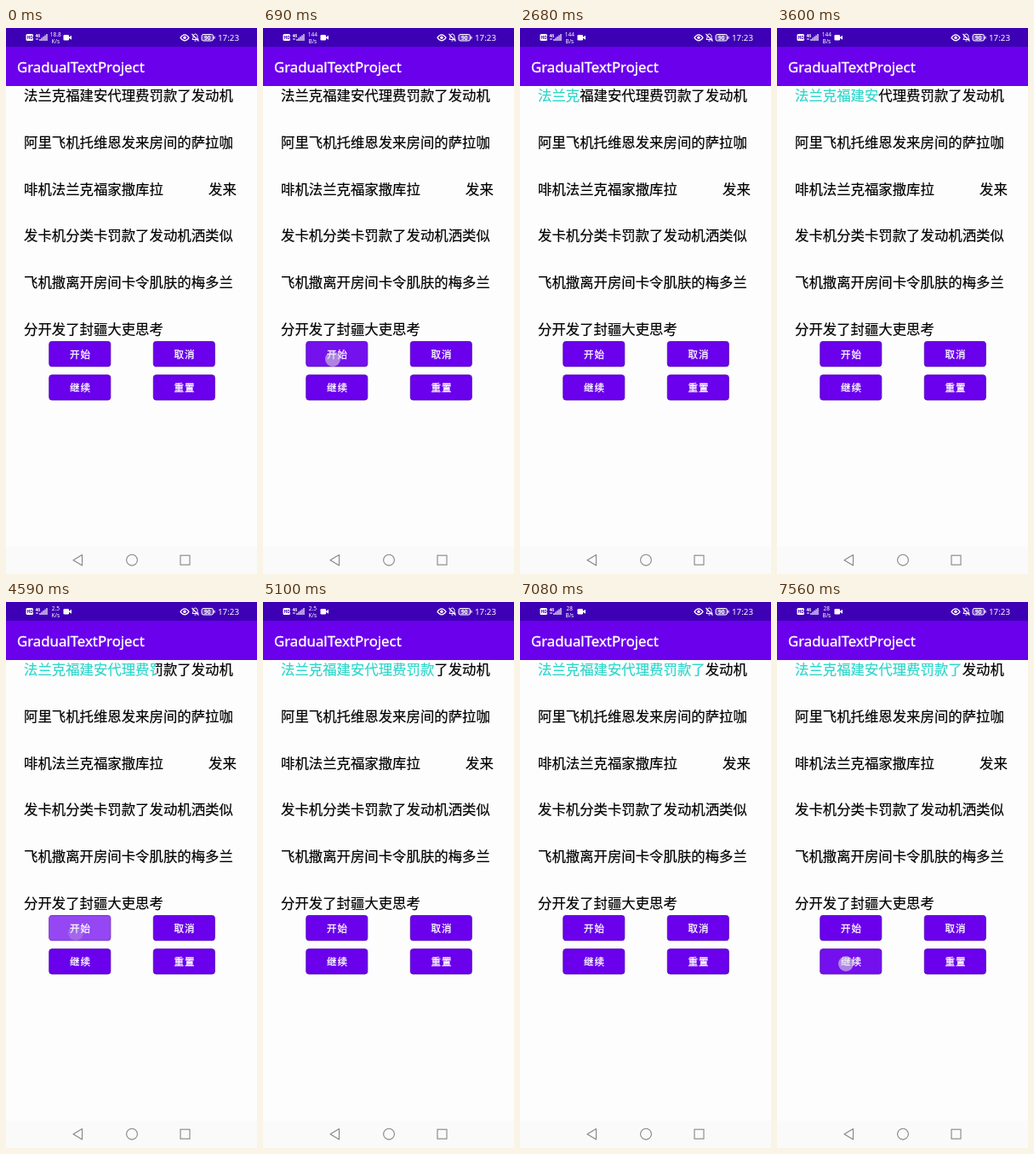
Recreate the animation shown at these times as an HTML page. Size 295x640 px, loop 8 s.

```html
<!DOCTYPE html>
<html lang="zh-CN">
<head>
<meta charset="utf-8">
<title>GradualTextProject</title>
<style>
html, body { margin: 0; height: 100%; overflow: hidden; background: #fdfdfd; }
svg { display: block; width: 295px; height: 640px; }
text { font-family: "Noto Sans CJK SC", "Noto Sans CJK", sans-serif; }
.latin, .latin text { font-family: "Noto Sans", sans-serif; fill: #fff; }
.title { font-size: 16.8px; stroke: #fff; stroke-width: .35px; }
.body { font-size: 16.4px; fill: #000; stroke: #000; stroke-width: .2px; }
.body .lit { fill: #2ed6cb; stroke: #2ed6cb; }
.label { font-size: 11.5px; font-weight: 500; letter-spacing: 1px; fill: #fff; stroke: #fff; stroke-width: .3px; text-anchor: middle; }
.button { fill: #6a00ec; stroke: #5200c0; stroke-width: .8px; filter: drop-shadow(0 .5px .5px #0004); }
</style>
</head>
<body>
<svg viewBox="0 0 295 640">
  <defs>
    <clipPath id="done"><rect id="doneBox" x="21" y="68" width="0" height="24"/></clipPath>
    <clipPath id="rest"><rect id="restBox" x="21" y="68" width="250" height="24"/></clipPath>
  </defs>
  <rect width="295" height="640" fill="#fdfdfd"/>
  <rect y="22" width="295" height="46" fill="#6a00ec"/>
  <rect width="295" height="22" fill="#3e00b4"/>
  <text class="latin title" x="13" y="52">GradualTextProject</text>

  <g class="latin">
    <rect x="23.5" y="7" width="8.5" height="8" rx="1.5" fill="#fff"/>
    <text x="24.5" y="13.2" font-size="5" font-weight="700" style="fill:#3e00b4">HD</text>
    <text x="34.5" y="10.5" font-size="5" font-weight="600">46</text>
    <path d="M35 13h3M40 15v-2M42 15v-3.5M44 15v-5M46 15v-6.5M48 15v-8" stroke="#fff" stroke-width="1.2"/>
    <g font-size="6.5" text-anchor="middle">
      <text id="rate" x="58.3" y="10.2"></text>
      <text id="unit" x="58.3" y="17.7"></text>
    </g>
    <rect x="67.5" y="8" width="6.5" height="6.5" rx="1.3" fill="#fff"/>
    <path d="M74 10.8l3-2v5l-3-2z" fill="#fff"/>
    <path d="M205 11.3q5-7 10 0q-5 7-10 0z" fill="none" stroke="#fff" stroke-width="1.2"/>
    <circle cx="210" cy="11.3" r="1.8" fill="#fff"/>
    <path d="M219 13.5h7l-1-2v-2q-.6-2.5-2.5-2.5t-2.5 2.5v2zM221.5 15h2" fill="none" stroke="#fff"/>
    <path d="M218.5 7l8 8.5" stroke="#fff" stroke-width="1.1"/>
    <rect x="230" y="7.5" width="13.5" height="7.5" rx="2" fill="#fff" fill-opacity=".25" stroke="#fff"/>
    <path d="M245 9.7v3" stroke="#fff" stroke-width="1.2"/>
    <text x="236.8" y="13.6" font-size="6.5" font-weight="600" text-anchor="middle">90</text>
    <text x="249" y="15.2" font-size="9.8">17:23</text>
  </g>

  <g id="lines" class="body"></g>
  <g id="buttons"></g>
  <circle id="finger" r="9" fill="#ddd" opacity="0"/>

  <rect y="608" width="295" height="32" fill="#fafafa"/>
  <g fill="none" stroke="#858585" stroke-width="1.1">
    <path d="M89.5 617.5v12.5L79 623.7z" stroke-linejoin="round"/>
    <circle cx="148" cy="623.7" r="6.4"/>
    <rect x="205" y="618.2" width="11" height="11"/>
  </g>
</svg>
<script>
const $ = id => document.getElementById(id);
const LOOP = 8000, LAST = 7560, WIDTH = 246;

const first = '法兰克福建安代理费罚款了发动机';
const line = (x, row, s, attrs = '') =>
  `<text x="${x}" y="${85 + row * 54.8}" ${attrs}>${s}</text>`;
$('lines').innerHTML =
  line(21, 0, first, 'clip-path="url(#rest)"') +
  line(21, 0, first, 'clip-path="url(#done)" class="lit"') +
  line(21, 1, '阿里飞机托维恩发来房间的萨拉咖') +
  line(21, 2, '啡机法兰克福家撒库拉') + line(238, 2, '发来') +
  line(21, 3, '发卡机分类卡罚款了发动机洒类似') +
  line(21, 4, '飞机撒离开房间卡令肌肤的梅多兰') +
  line(21, 5, '分开发了封疆大吏思考');

$('buttons').innerHTML = ['开始', '取消', '继续', '重置'].map((label, i) => {
  const x = 50.8 + i % 2 * 122.5, y = 367.5 + (i >> 1) * 39.3;
  const box = `x="${x}" y="${y}" width="72" height="29.2" rx="3"`;
  return `<rect class="button" ${box}/><rect id="glow${i}" ${box} fill="#fff" opacity="0"/>
    <text class="label" x="${x + 36.8}" y="${y + 19.1}">${label}</text>`;
}).join('');

const presses = [
  { button: 0, from: 670, to: 930, x: 82, y: 388 },
  { button: 0, from: 4490, to: 5000, x: 82, y: 388 },
  { button: 1, from: 5250, to: 5760, x: 209, y: 386 },
  { button: 2, from: 7540, to: 8050, x: 81, y: 424 }
];
const rates = [[0, '18.8', 'K/s'], [690, '144', 'B/s'], [3690, '2.5', 'K/s'], [6270, '28', 'B/s']];

// Ease-in-out sweep, paused by the cancel button
function sweep(t) {
  const p = Math.max(0, (Math.min(t, 5370) - 710) / 6660);
  return WIDTH * (1 - Math.cos(Math.PI * p)) / 2;
}

function draw(t) {
  const w = sweep(t);
  $('doneBox').setAttribute('width', w);
  $('restBox').setAttribute('x', 21 + w);

  const [, rate, unit] = rates.findLast(r => t >= r[0]);
  $('rate').textContent = rate;
  $('unit').textContent = unit;

  const glow = [0, 0, 0, 0];
  let touch = 0;
  for (const { button, from, to, x, y } of presses) {
    if (t < from || t > to) continue;
    const age = t - from;
    glow[button] = 0.28 * Math.min(1, age / 90, (to - t) / (to - from - 100));
    touch = 0.65 * Math.max(0, 1 - age / 150);
    $('finger').setAttribute('cx', x);
    $('finger').setAttribute('cy', y);
  }
  glow.forEach((a, i) => $('glow' + i).setAttribute('opacity', a));
  $('finger').setAttribute('opacity', touch);
}

const start = performance.now();
function tick() {
  draw(Math.min((performance.now() - start) % LOOP, LAST));
  requestAnimationFrame(tick);
}
tick();
</script>
</body>
</html>
```
